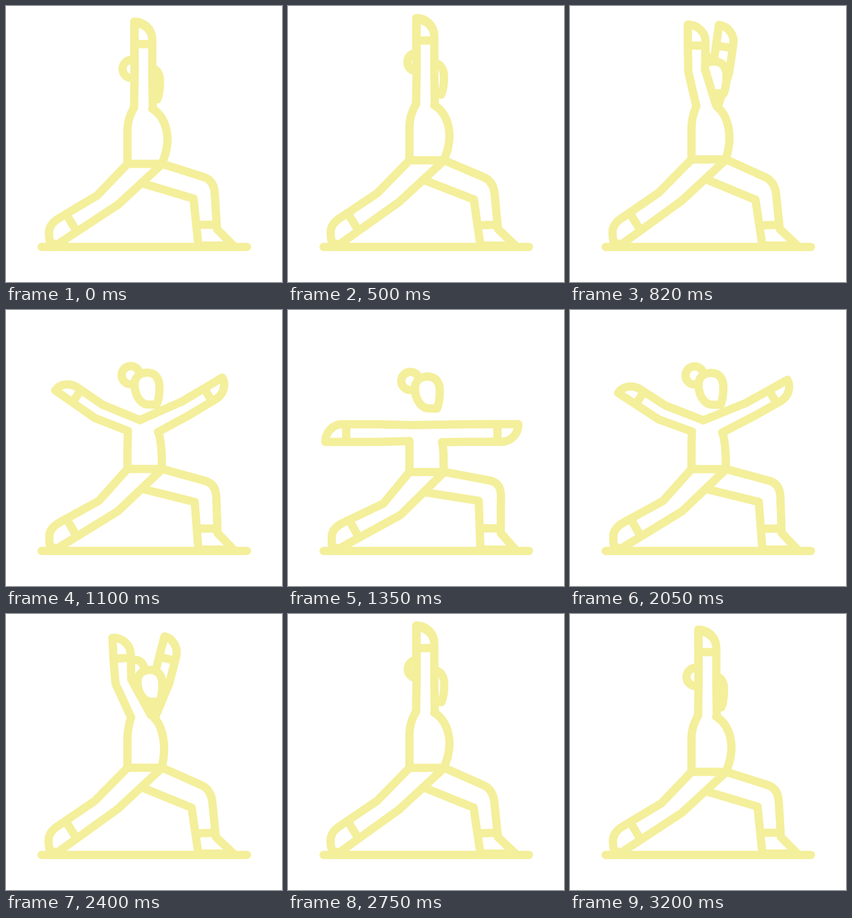
These frames come from a looping animation (500x500 px, 3.22 s). An HTML page:

```html
<!DOCTYPE html>
<html lang="en">
<head>
<meta charset="utf-8">
<title>Yoga warrior pose</title>
<style>
  html, body { margin: 0; width: 100%; height: 100%; overflow: hidden; background: #fff; }
  svg { display: block; width: 100vw; height: 100vh; }
  path, circle {
    fill: none; stroke: #f4ef9b; stroke-width: 15;
    stroke-linecap: round; stroke-linejoin: round;
  }
  .solid { fill: #fff; }
  .fill { fill: #fff; stroke: none; }
</style>
</head>
<body>
<svg viewBox="0 0 500 500">
  <path d="M64.5 436.5H436.5"/>
  <path id="legs"/>
  <circle id="bun" cx="226" cy="118" r="16.5"/>
  <path id="farFill" class="fill"/>
  <path id="farArm"/>
  <path id="head" class="solid" d="M256 113.5C271 113.5 278 124 278 140C278 152 276 164 273 171.5L255 171C242 169 233 152 233 135C233 121 243 113.5 256 113.5Z"/>
  <path id="nearFill" class="fill"/>
  <path id="nearArm"/>
  <path id="torso"/>
</svg>
<script>
const LOOP = 3220;
const el = id => document.getElementById(id);
const mix = (a, b, k) => a.map((v, i) => v + (b[i] - v) * k);

// Waist height, forearm length, then degrees from upright:
// near upper arm, near forearm, far upper arm, far forearm
const joined = [286, 56, 0, 0, -12, 0];
const lifted = [276, 56, 0, 0, -12, 0];
const parting = [278, 45, 15, 0, 10, 8];
const raised = [278.5, 42, 27, 3, 17, 14.5];
const open = [288, 48, 68, 55, 63, 59];
const level = [292.5, 56, 90, 90, 88, 90];
const stretched = [294.5, 58, 90, 90, 90, 90];

const keys = [
  [0, joined], [220, joined], [690, lifted], [820, parting], [870, raised],
  [1100, open], [1272, level], [1530, stretched], [1820, level], [2064, open],
  [2400, raised], [2465, parting], [2560, lifted], [3120, joined], [LOOP, joined]
];

// Monotone cubic interpolation: smooth, never overshooting a key
const rate = (i, c) => (keys[i + 1][1][c] - keys[i][1][c]) / (keys[i + 1][0] - keys[i][0]);
function slope(i, c) {
  if (i === 0 || i === keys.length - 1) return 0;
  const a = rate(i - 1, c), b = rate(i, c);
  return a * b > 0 ? 2 * a * b / (a + b) : 0;
}
function poseAt(t) {
  let i = 0;
  while (i < keys.length - 2 && t >= keys[i + 1][0]) i++;
  const [t0, a] = keys[i], [t1, b] = keys[i + 1];
  const d = t1 - t0, u = (t - t0) / d, w = 1 - u;
  return a.map((v, c) =>
    v * (1 + 2 * u) * w * w + b[c] * u * u * (3 - 2 * u) +
    d * u * w * (w * slope(i, c) - u * slope(i + 1, c)));
}

// Moves a point along a direction given in degrees clockwise from up
function go([x, y], deg, length) {
  const a = deg * Math.PI / 180;
  return [x + Math.sin(a) * length, y - Math.cos(a) * length];
}
const skew = deg => Math.abs(Math.sin(deg * Math.PI / 90));

// Both edges of the sleeve at a joint; it thins on the diagonals
function edges(p, deg) {
  const half = 16 - 2.5 * skew(deg);
  return [go(p, deg - 90, half), go(p, deg + 90, half)];
}

function drawArm(name, root, upper, fore, length, from, to) {
  const elbow = go(root, upper, 60 + 13 * skew(upper));
  const [e1, e2] = edges(elbow, (upper + fore) / 2);
  const [w1, w2] = edges(go(elbow, fore, length), fore);
  const tip = go(w1, fore, 38), corner = go(w2, fore, 38);
  const end = mix(corner, w2, .8);
  const hand = `${tip}C${mix(tip, corner, .55)} ${mix(end, corner, .55)} ${end}`;
  const outline = `M${from}L${e1}L${w1}L${hand}L${w2}L${e2}L${to}`;
  el(name + "Fill").setAttribute("d", outline + "Z");
  el(name + "Arm").setAttribute("d", `${outline}M${w1}L${w2}`);
}

function drawLegs(waist, depth) {
  const at = (x, y, dx, dy) => [x + dx * depth, y + dy * depth];
  const hip = [283, waist];

  const knee = at(161, 338, 11, 12), ankle = at(97, 382, 1, 4), heel = at(77, 410, 2, 2);
  const under = at(202, 353, 2, 17), sole = [93, 432];
  const back = `M220 ${waist}L${knee}L${ankle}Q${heel[0]} ${heel[1] - 16} ${heel}` +
    `Q${heel[0]} 422 80 429L${sole}L${under}L${hip}` +
    `M${mix(knee, ankle, .83)}L${mix(under, sole, .68)}`;

  const thigh = mix(hip, under, .47), inner = at(336, 351, 9, -5), foot = [348.5, 434];
  const bend = at(371, 318, 14, -5), shin = at(380, 404, 5, 0);
  const front = `M${thigh}L${inner}L${foot}H412L${shin}` +
    `L${mix(bend, shin, .27)}Q${bend} ${mix(bend, hip, .2)}L${hip}` +
    `M${mix(inner, foot, .56)}L${mix(bend, shin, .91)}`;

  el("legs").setAttribute("d", back + front);
}

function draw(now) {
  const [waist, length, upper, fore, farUpper, farFore] = poseAt(now % LOOP);
  const spread = upper / 90, sink = 46 * spread ** 1.2, drop = waist - 288;

  const pit = [232 - 12 * Math.sin(spread * Math.PI / 2), waist - 102 + sink];
  const neck = [266 - 41 * spread ** 2, waist - 100 + 15 * spread];
  const farPit = [265 + 14 * spread, waist - 100 + sink];
  const farRoot = [262, (neck[1] + farPit[1]) / 2];

  drawLegs(waist, (waist - 278) / 14.5 * (.75 + .25 * spread));
  drawArm("far", farRoot, farUpper, farFore, length, neck, farPit);
  drawArm("near", mix(pit, neck, .5), -upper, -fore, length, pit, neck);
  el("bun").setAttribute("transform", `translate(${-.8 * drop} ${1.95 * drop})`);
  el("head").setAttribute("transform", `translate(${-.55 * drop} ${1.3 * drop})`);

  const chest = 22 * (1 - spread) ** 2, side = waist - farPit[1];
  el("torso").setAttribute("d",
    `M${pit}Q220 ${pit[1] + 20} 220 ${pit[1] + 42}V${waist}H282` +
    `C${282 + chest} ${farPit[1] + side * .52} ` +
    `${farPit[0] + chest * .9 + 3} ${farPit[1] + side * .14} ${farPit}`);

  requestAnimationFrame(() => draw(performance.now() - start));
}
const start = performance.now();
draw(0);
</script>
</body>
</html>
```
